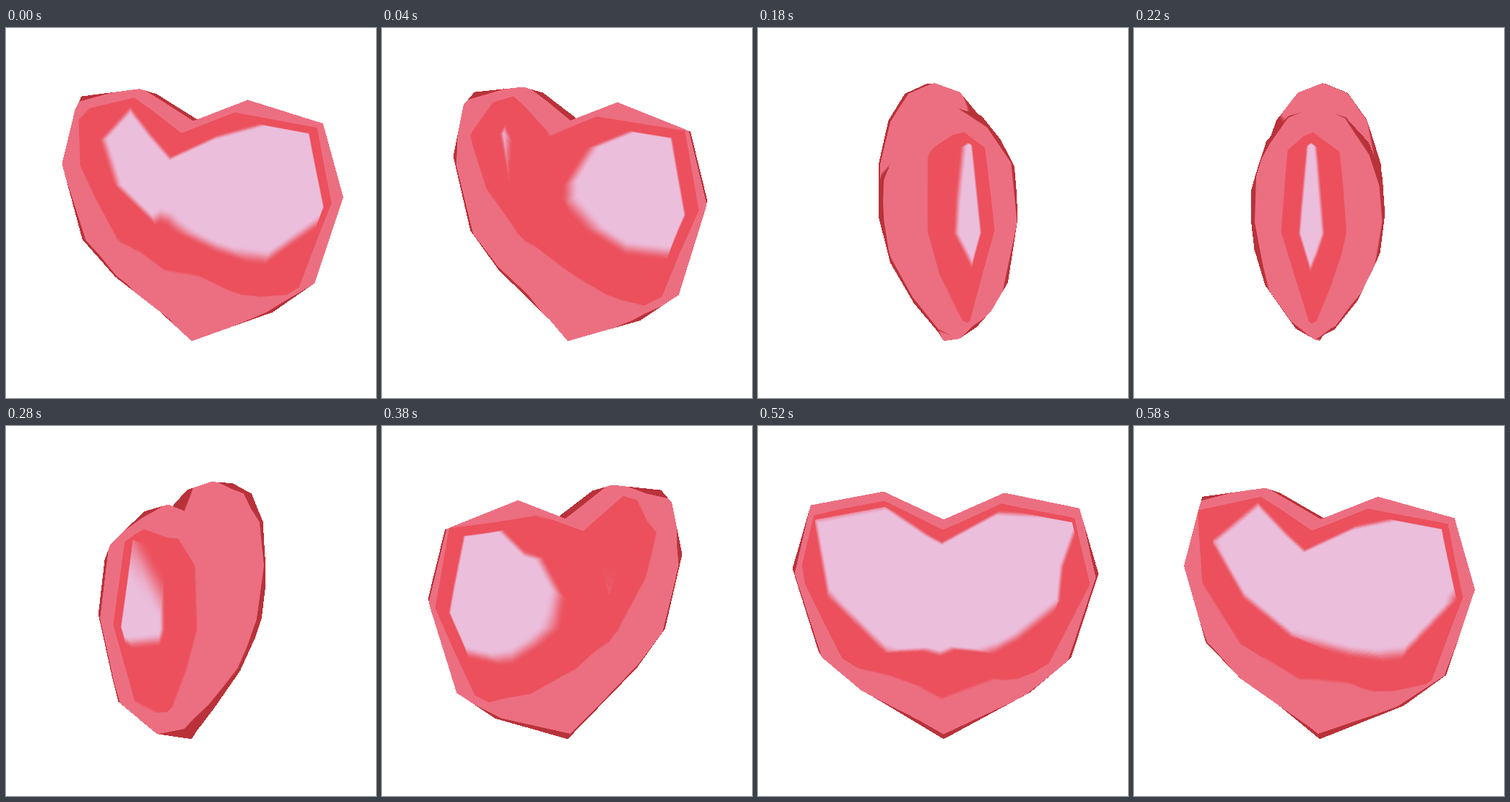
These frames come from a looping animation (512 by 512 pixels, 600 ms). An HTML page with a canvas:

```html
<!DOCTYPE html>
<html lang="en">
<head>
<meta charset="utf-8">
<title>Turning heart</title>
<style>
html, body { margin: 0; width: 100%; height: 100%; overflow: hidden; background: #fff; }
canvas { display: block; width: 512px; height: 512px; }
</style>
</head>
<body>
<canvas id="stage" width="512" height="512"></canvas>
<script>
const SIZE = 512, LOOP = 600, STEP = 20;
const CX = 257, CY = 256, DISTANCE = 900;
const PITCH = 21.7 * Math.PI / 180;
const COS = Math.cos(PITCH), SIN = Math.sin(PITCH);

// Inflated heart: one flat outline, shrunk in rings towards a front and a back pole.
const DEPTH = 90, RINGS = 4;
const HALF = [[0, -129], [78, -165], [175, -146], [207, -58], [180, 66], [125, 124], [0, 207]];
const OUTLINE = HALF.concat(HALF.slice(1, -1).reverse().map(([x, y]) => [-x, y]));
const TIP = HALF.length - 1;

// Shades by how much the surface faces the viewer: [from, softness, colour].
const DARK = [185, 50, 58];
const BANDS = [
  [0.25, 0.012, [236, 111, 129]],
  [0.67, 0.008, [235, 80, 92]],
  [0.845, 0.016, [235, 190, 220]]
];

const verts = [], faces = [];

function addVertex(x, y, z) {
  return verts.push({ p: [x, y, z], n: [0, 0, 0] }) - 1;
}

function addRing(j) {
  const a = j / RINGS * Math.PI / 2, k = Math.cos(a), z = DEPTH * Math.sin(a);
  if (Math.abs(j) === RINGS) return OUTLINE.fill.call(OUTLINE.slice(), addVertex(0, 0, z));
  return OUTLINE.map(([x, y]) => {
    const low = Math.max(0, y * k / OUTLINE[TIP][1]);
    return addVertex(x * k, y * k, z * (1 - 0.9 * low * low));
  });
}

function addFace(...ids) {
  const [a, b, c] = ids.map(i => verts[i].p);
  const u = b.map((v, i) => v - a[i]), w = c.map((v, i) => v - a[i]);
  const n = [u[1] * w[2] - u[2] * w[1], u[2] * w[0] - u[0] * w[2], u[0] * w[1] - u[1] * w[0]];
  const out = Math.sign(n.reduce((s, v, i) => s + v * (a[i] + b[i] + c[i]), 0));
  for (const id of ids) n.forEach((v, i) => verts[id].n[i] += v * out);
  faces.push(ids);
}

const rings = [];
for (let j = -RINGS; j <= RINGS; j++) rings.push(addRing(j));
for (let j = 0; j < 2 * RINGS; j++) {
  OUTLINE.forEach((_, i) => {
    const next = (i + 1) % OUTLINE.length;
    const [a, b] = [rings[j], rings[j + 1]];
    addFace(a[i], a[next], b[i]);
    addFace(a[next], b[next], b[i]);
  });
}
// The tip is shaded as if it leaned to one side, so its shadow comes and goes.
verts[rings[RINGS][TIP]].n = [0.6, 0.5, 0.6];
for (const v of verts) {
  const len = Math.hypot(...v.n);
  v.n = v.n.map(c => c / len);
}

function project({ p, n }, c, s) {
  const x = p[0] * c - p[2] * s, z = p[2] * c + p[0] * s;
  const near = z * COS - p[1] * SIN;
  const scale = DISTANCE / (DISTANCE - near);
  return {
    x: CX + x * scale,
    y: CY + (p[1] * COS + z * SIN) * scale,
    z: near,
    light: (n[2] * c + n[0] * s) * COS - n[1] * SIN
  };
}

// Ramp lookup, prepared for light from -1 to 1.
const SHADES = 1024;
const ramp = Array.from({ length: SHADES + 1 }, (_, i) => {
  const light = i / SHADES * 2 - 1;
  return BANDS.reduce((color, [from, soft, next]) => {
    const u = Math.min(1, Math.max(0, (light - from) / (2 * soft) + 0.5));
    const k = u * u * (3 - 2 * u);
    return color.map((v, c) => v + (next[c] - v) * k);
  }, DARK);
});

const ctx = document.getElementById('stage').getContext('2d');
const image = ctx.createImageData(SIZE, SIZE);
const nearest = new Float32Array(SIZE * SIZE);

function fillTriangle(a, b, c) {
  const area = (b.x - a.x) * (c.y - a.y) - (b.y - a.y) * (c.x - a.x);
  if (Math.abs(area) < 1e-6) return;
  const x0 = Math.floor(Math.min(a.x, b.x, c.x)), x1 = Math.ceil(Math.max(a.x, b.x, c.x));
  const y0 = Math.floor(Math.min(a.y, b.y, c.y)), y1 = Math.ceil(Math.max(a.y, b.y, c.y));
  for (let y = y0; y < y1; y++) {
    for (let x = x0; x < x1; x++) {
      const dx = x + 0.5 - a.x, dy = y + 0.5 - a.y;
      const u = (dx * (c.y - a.y) - dy * (c.x - a.x)) / area;
      const v = (dy * (b.x - a.x) - dx * (b.y - a.y)) / area;
      if (u < 0 || v < 0 || u + v > 1) continue;
      const at = y * SIZE + x;
      const z = a.z + u * (b.z - a.z) + v * (c.z - a.z);
      if (z <= nearest[at]) continue;
      nearest[at] = z;
      const light = a.light + u * (b.light - a.light) + v * (c.light - a.light);
      image.data.set(ramp[Math.round((light + 1) / 2 * SHADES)], at * 4);
    }
  }
}

function draw(t) {
  const turn = (27 + 180 * t / LOOP) * Math.PI / 180;
  const c = Math.cos(turn), s = Math.sin(turn);
  const pts = verts.map(v => project(v, c, s));
  image.data.fill(255);
  nearest.fill(-Infinity);
  for (const face of faces) fillTriangle(...face.map(i => pts[i]));
  ctx.putImageData(image, 0, 0);
}

const start = performance.now();
let shown = -1;

function tick() {
  const t = Math.floor((performance.now() - start) % LOOP / STEP) * STEP;
  if (t !== shown) draw(shown = t);
  requestAnimationFrame(tick);
}
tick();
</script>
</body>
</html>
```
